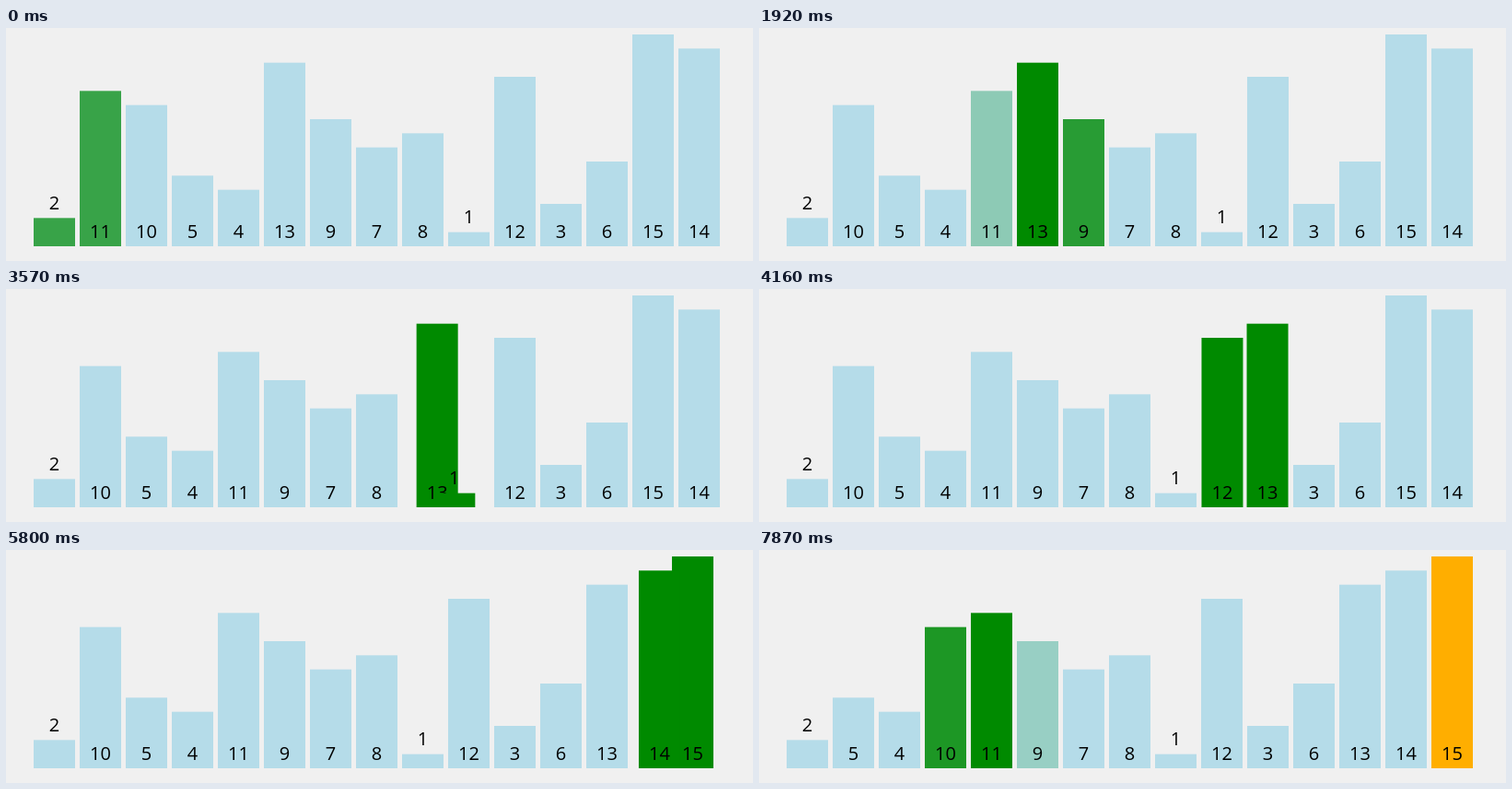
These frames come from a looping animation (811 by 253 pixels, 8000 ms). An HTML page:

```html
<!DOCTYPE html>
<html lang="en">
<head>
<meta charset="utf-8">
<title>Bubble sort</title>
<style>
  html, body { margin: 0; width: 100%; height: 100%; overflow: hidden; background: #f0f0f0; }
  svg { display: block; width: 811px; height: 253px; }
  text { font: 20px "Open Sans", "Noto Sans", sans-serif; text-anchor: middle; fill: #000; }
</style>
</head>
<body>
<svg id="stage" viewBox="0 0 811 253"></svg>
<script>
const LOOP = 8000;
const BASE = 237, UNIT = 230 / 15, LEFT = 30, STEP = 50, WIDTH = 45;
const TONES = { idle: [181, 220, 233], active: [0, 138, 0], sorted: [255, 174, 0] };
const values = [2, 11, 10, 5, 4, 13, 9, 7, 8, 1, 12, 3, 6, 15, 14];

// Start times (ms) of some steps; the steps between are evenly spaced.
const anchors = [[0, -136], [8, 1771], [17, 3952], [24, 5639], [29, 6842], [33, 7789], [34, 8029]];

// Run the sort and record slot and tone of each bar after every step.
function record() {
  const order = values.map((_, i) => i);
  const steps = [];
  let done = values.length;
  const snap = pair => {
    const step = [];
    order.forEach((bar, slot) => {
      const tone = slot >= done ? "sorted" : pair.includes(slot) ? "active" : "idle";
      step[bar] = { x: LEFT + STEP * slot, rgb: TONES[tone] };
    });
    steps.push(step);
  };
  snap([]);
  for (let pass = 0; pass < 2; pass++) {
    for (let i = 0; i + 1 < done; i++) {
      snap([i, i + 1]);
      if (values[order[i]] > values[order[i + 1]]) {
        [order[i], order[i + 1]] = [order[i + 1], order[i]];
        snap([i, i + 1]);
      }
    }
    done--;
    snap([]);
    snap([]);
  }
  return steps;
}

function stepAt(time) {
  const i = anchors.findIndex(a => a[1] > time);
  const [k0, t0] = anchors[i - 1], [k1, t1] = anchors[i];
  return k0 + (k1 - k0) * (time - t0) / (t1 - t0);
}

const ease = t => t < 0.5 ? 4 * t ** 3 : 1 - 4 * (1 - t) ** 3;
const mix = (a, b, p) => a + (b - a) * p;

function add(parent, name, attrs = {}) {
  const el = document.createElementNS("http://www.w3.org/2000/svg", name);
  for (const key in attrs) el.setAttribute(key, attrs[key]);
  return parent.appendChild(el);
}

const stage = document.getElementById("stage");
const bars = values.map(v => {
  const g = add(stage, "g");
  const h = v * UNIT;
  const rect = add(g, "rect", { y: BASE - h, width: WIDTH, height: h });
  const y = v < 3 ? BASE - h - 9.5 : BASE - 9.2;
  add(g, "text", { x: WIDTH / 2, y }).textContent = v;
  return { g, rect };
});

const steps = record();

function draw(time) {
  const pos = stepAt(time);
  const k = Math.floor(pos);
  const p = ease(pos - k);
  bars.forEach(({ g, rect }, i) => {
    const from = steps[k][i], to = steps[k + 1][i];
    const rgb = from.rgb.map((c, n) => Math.round(mix(c, to.rgb[n], p)));
    g.setAttribute("transform", `translate(${mix(from.x, to.x, p).toFixed(3)} 0)`);
    rect.setAttribute("fill", `rgb(${rgb})`);
  });
}

const start = performance.now();
function tick(now) {
  draw(Math.max(0, now - start) % LOOP);
  requestAnimationFrame(tick);
}
tick(start);
</script>
</body>
</html>
```
